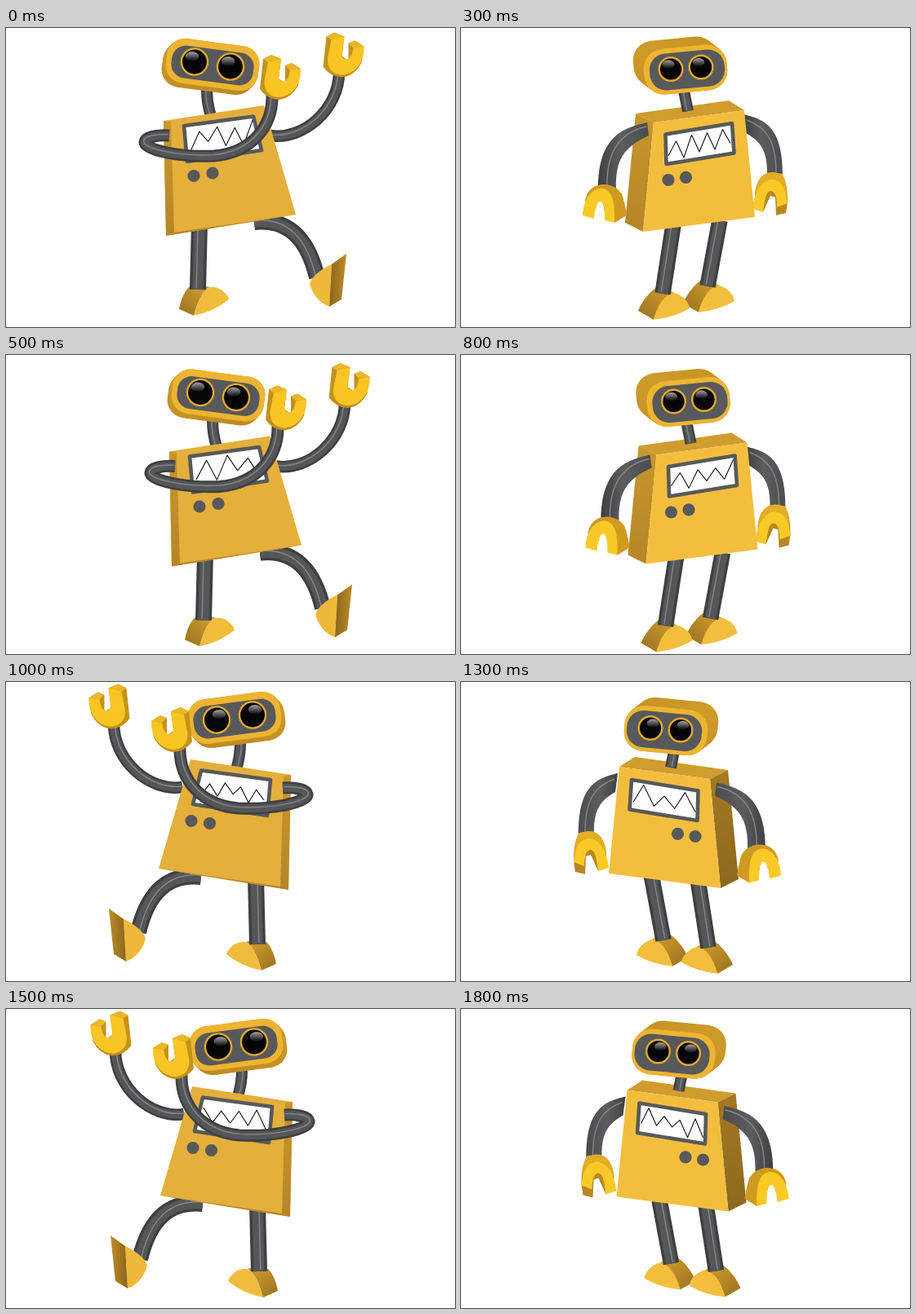
An HTML page that plays this animation: 550x367 px, repeating every 2000 ms.

```html
<!DOCTYPE html>
<html lang="en">
<head>
<meta charset="utf-8">
<title>Dancing robot</title>
<style>
  html, body { margin: 0; width: 100%; height: 100%; overflow: hidden; background: #fff; }
  svg { display: block; width: 100vw; height: 100vh; }
  .pose { visibility: hidden; animation: 2s step-end infinite; }
  .dab { animation-name: long; }
  .stand { animation-name: short; }
  @keyframes long { 0% { visibility: visible; } 15%, 100% { visibility: hidden; } }
  @keyframes short { 0% { visibility: visible; } 10%, 100% { visibility: hidden; } }
  .limb { fill: none; }
  .graph { fill: none; stroke: #111; stroke-width: 1.1; stroke-linejoin: round; }
  .screen { fill: #fff; stroke: #58595b; stroke-width: 4.6; stroke-linejoin: round; }
</style>
</head>
<body>
<svg id="stage" viewBox="0 0 550 367">
  <defs>
    <linearGradient id="side" x1="0" y1="0" x2="0" y2="1">
      <stop offset="0" stop-color="#c9962b"/><stop offset="1" stop-color="#b58528"/>
    </linearGradient>
    <linearGradient id="shade" x1="0" y1="0" x2="0" y2="1">
      <stop offset="0" stop-color="#a57a22"/><stop offset="1" stop-color="#8b681f"/>
    </linearGradient>
    <linearGradient id="rim" x1="0" y1="0" x2="1" y2="1">
      <stop offset="0" stop-color="#d09c29"/><stop offset="1" stop-color="#bb8820"/>
    </linearGradient>
    <linearGradient id="sole" x1="0" y1="0" x2="1" y2="0">
      <stop offset="0" stop-color="#8d651b"/><stop offset="1" stop-color="#bd8c28"/>
    </linearGradient>
    <linearGradient id="heel" x1="0" y1="1" x2="1" y2="0">
      <stop offset="0" stop-color="#98701f"/><stop offset="1" stop-color="#d6a22f"/>
    </linearGradient>
    <linearGradient id="arm" x1="0" y1="0" x2="1" y2="0">
      <stop offset="0" stop-color="#3f4043"/><stop offset=".45" stop-color="#5c5d60"/><stop offset="1" stop-color="#4b4c4f"/>
    </linearGradient>
    <linearGradient id="shine" x1="0" y1="0" x2="0" y2="1">
      <stop offset="0" stop-color="#fff" stop-opacity=".9"/><stop offset="1" stop-color="#fff" stop-opacity="0"/>
    </linearGradient>
  </defs>
</svg>
<script>
const shape = (d, fill) => `<path d="${d}" fill="${fill}"/>`;
const move = (x, y, art) => `<g transform="translate(${x} ${y})">${art}</g>`;
const flip = (x, y, art) => `<g transform="matrix(-1 0 0 1 ${x} ${y})">${art}</g>`;
const streak = d => `<path class="limb" d="${d}" stroke="#85868a" stroke-width="1.4"/>`;

// A tube: dark edge, grey core, thin light streak.
function limb(d, w) {
  const line = (color, width) => `<path class="limb" d="${d}" stroke="${color}" stroke-width="${width}"/>`;
  return line('#3e3f42', w) + line('#55565a', w * .66) + move(-w * .09, -w * .09, streak(d));
}

function slab(cx, cy, w, h, r, angle, fill) {
  return `<rect x="${cx - w / 2}" y="${cy - h / 2}" width="${w}" height="${h}" rx="${r}" fill="${fill}" transform="rotate(${angle} ${cx} ${cy})"/>`;
}

// A rounded face with its thickness swept back by (dx, dy).
function block(dx, dy, ...box) {
  let art = '';
  for (let k = 1; k > 0; k -= .1) art += move(dx * k, dy * k, slab(...box, 'url(#rim)'));
  return art + slab(...box, '#edb431');
}

function eye(x, y, r) {
  return `<circle cx="${x}" cy="${y}" r="${r}" fill="#e3a92d"/>
    <circle cx="${x}" cy="${y}" r="${r - 2.4}" fill="#050505"/>
    <ellipse cx="${x - 3}" cy="${y - r * .38}" rx="${r * .48}" ry="${r * .34}" fill="url(#shine)" opacity=".7"/>`;
}

// Two knobs, starting at (x, y); the second lies (dx, dy) away.
const knobs = (x, y, dx, dy) => [0, 1].map(k =>
  `<circle cx="${x + dx * k}" cy="${y + dy * k}" r="7.6" fill="#58595b"/>`).join('');

// A seeded zigzag along the middle of a screen, from (x, y) over (dx, dy).
function graph(seed, x, y, dx, dy) {
  const random = k => { const v = Math.sin(seed * 91.7 + k * 37.3) * 9301; return v - Math.floor(v); };
  const steps = 6 + seed % 3;
  let d = '';
  for (let k = 0; k <= steps; k++) {
    const t = k / steps, swing = (k % 2 ? -1 : 1) * (4 + 11 * random(k));
    d += `${k ? 'L' : 'M'}${x + dx * t} ${y + dy * t + swing}`;
  }
  return `<path class="graph" d="${d}"/>`;
}

// Parts of the dancing pose
const dabHead = limb('M246 76 Q246 92 251 108', 14)
  + block(-5, 5, 253, 45, 114, 55, 22, 7.6)
  + slab(253, 46, 101, 40, 17, 7.6, '#58595b')
  + eye(231, 41.5, 17.3) + eye(275, 47.5, 17.3);

const dabHand = shape('M315 38 L325 33 L337 38 L334 62 L342 68 L342 46 L350 43 L361 50 L358 70 Q350 86 334 88 Q319 87 311 75 Z', '#c4911c')
  + shape('M315 38 L325 33 L337 38 L321 42 Z M348 52 L342 46 L350 43 L361 50 Z', '#eab628')
  + shape('M321 42 L337 38 L334 60 Q335 67 340 66 Q346 65 348 52 L361 50 C362 70 350 84 334 85 C320 84 315 74 317 62 Z', '#f8c524');

const dabFarArm = limb('M324 132 C364 138 408 100 408 54', 14.5) + move(77.5, -27.5, dabHand);
const dabNearArm = limb('M200 132 C184 131 171 134 170 140 C169 150 215 159 255 157 C300 153 327 122 326 82', 15) + dabHand;

const dabLegs = limb('M304 238 C344 234 369 256 381 306', 20)
  + shape('M399 290 C386 296 376 304 372 313 C374 325 384 338 396 342 Z', '#eeb93a')
  + shape('M417 277 L399 290 L396 342 L411 333 Z', 'url(#sole)')
  + shape('M212 345 C214 334 218 324 224 318 Q237 314 250 318 C240 323 235 336 230 353 Z', 'url(#heel)')
  + shape('M230 353 C235 336 241 321 251 318 C262 317 271 326 273 333 Q255 348 230 353 Z', '#f0bc3c')
  + limb('M237 240 L235 321', 20);

const dabBody = seed => shape('M193 114 L316 95 L355 229 L196 255 Z', '#e4af3a')
  + shape('M193 114 L202 115 L206 251 L355 229 L196 255 Z', 'url(#side)')
  + '<polygon class="screen" points="218,120 303,108.5 313,150 222,164"/>'
  + graph(seed, 226, 138, 76, -10);

// Parts of the standing pose
const standHead = block(-13, -10, 275, 51, 102, 56, 24, -5.5)
  + slab(277, 51.5, 92, 45, 20, -5.5, '#58595b')
  + eye(257, 50.5, 15.5) + eye(294, 48, 15.5);

const neck = limb('M272 72 L278 102', 14);

const standBody = (fill, seed) => shape('M214 105 L328 89 L347 101 L236 116 Z', '#d09c2d')
  + shape('M214 105 L236 116 L223 250 L201 239 Z', fill)
  + shape('M236 116 L347 101 L360 232 L223 250 Z', '#f3be3e')
  + '<polygon class="screen" points="250.5,130.5 332,117 334.5,153.5 251.5,167"/>'
  + graph(seed, 254, 147, 76, -11) + knobs(254, 186.5, 21.5, -3.2);

const foot = shape('M217 347 C222 335 232 322 242 317 Q253 319 262 326 C247 332 240 345 236 358 Z', 'url(#heel)')
  + shape('M236 358 C240 342 248 328 260 325 C271 327 279 336 280 344 Q262 355 236 358 Z', '#f3be3e');

const standLegs = move(55, -9, foot) + limb('M317 236 L302 317', 19.5)
  + foot + limb('M260 242 L247 326', 19.5);

const standFarArm = shape('M346 106 C372 112 395 121 394 184 L375 184 C376 151 368 140 349 129 Z', 'url(#arm)')
  + streak('M350 113 C372 121 386 136 386 178')
  + shape('M360 207 C361 188 369 177 382 177 L393 179 C399 188 400 202 400 214 L398 227 L386 230 L385 208 L379 206 L370 226 Z', '#b78820')
  + shape('M360 204 C361 188 369 177 382 177 L393 179 C398 187 399 198 399 210 L380 192 Z', '#e3ad25')
  + shape('M357 222 C359 202 368 187 381 186 C393 186 399 200 400 215 L387 220 C387 206 384 200 379 200 C373 201 372 212 370 226 Z', '#f8c927');

const standNearArm = shape('M228 116 C201 122 168 131 168 197 L190 197 C189 161 200 146 230 132 Z', 'url(#arm)')
  + streak('M227 121 C200 127 178 146 179 194')
  + shape('M152 212 C155 197 164 192 177 192 Q190 193 197 204 Q201 215 203 230 L188 239 Z', '#cf9a20')
  + shape('M165 224 Q166 212 171 212 Q175 212 177 235 Z', '#fff')
  + shape('M149 230 C150 210 160 197 172 197 C186 198 189 215 188 239 L176 236 C176 222 175 213 171 213 C166 213 164 222 163 234 Z', '#f9ca26');

const rightDab = seed => dabFarArm + dabLegs + dabHead + dabBody(seed) + knobs(230, 181.5, 23, -3.5) + dabNearArm;

const leftDab = seed => flip(540, -3, dabFarArm) + flip(543, 1, dabLegs) + flip(533, -1, dabHead)
  + flip(542, 0, dabBody(seed)) + knobs(227, 170.5, 22.5, 3) + flip(539, -2, dabNearArm);

const rightStand = seed => standFarArm + standLegs + standBody('url(#side)', seed) + standNearArm + neck + standHead;

const leftStand = seed => flip(538, 6, standFarArm) + flip(550, 0, standLegs)
  + flip(541, 3, standBody('url(#shade)', seed)) + flip(541, 7.5, standNearArm)
  + flip(535, 3, neck) + flip(526, 8.5, standHead);

// Each side dances dab, stand, dab, stand; the second round drifts a little.
const steps = [
  { kind: 'dab', art: rightDab, drift: [7, 4.5] },
  { kind: 'stand', art: rightStand, drift: [3.5, 6.5] },
  { kind: 'dab', art: leftDab, drift: [2, 0] },
  { kind: 'stand', art: leftStand, drift: [9.5, -4.5] }
];

let poses = '';
for (let i = 0; i < 8; i++) {
  const { kind, art, drift } = steps[(i >> 2) * 2 + i % 2];
  const start = (i >> 1) * 500 + (i % 2) * 300;
  const [dx, dy] = (i >> 1) % 2 ? drift : [0, 0];
  poses += `<g class="pose ${kind}" style="animation-delay:${start ? start - 2000 : 0}ms">${move(dx, dy, art(i + 1))}</g>`;
}
document.getElementById('stage').insertAdjacentHTML('beforeend', poses);
</script>
</body>
</html>
```
